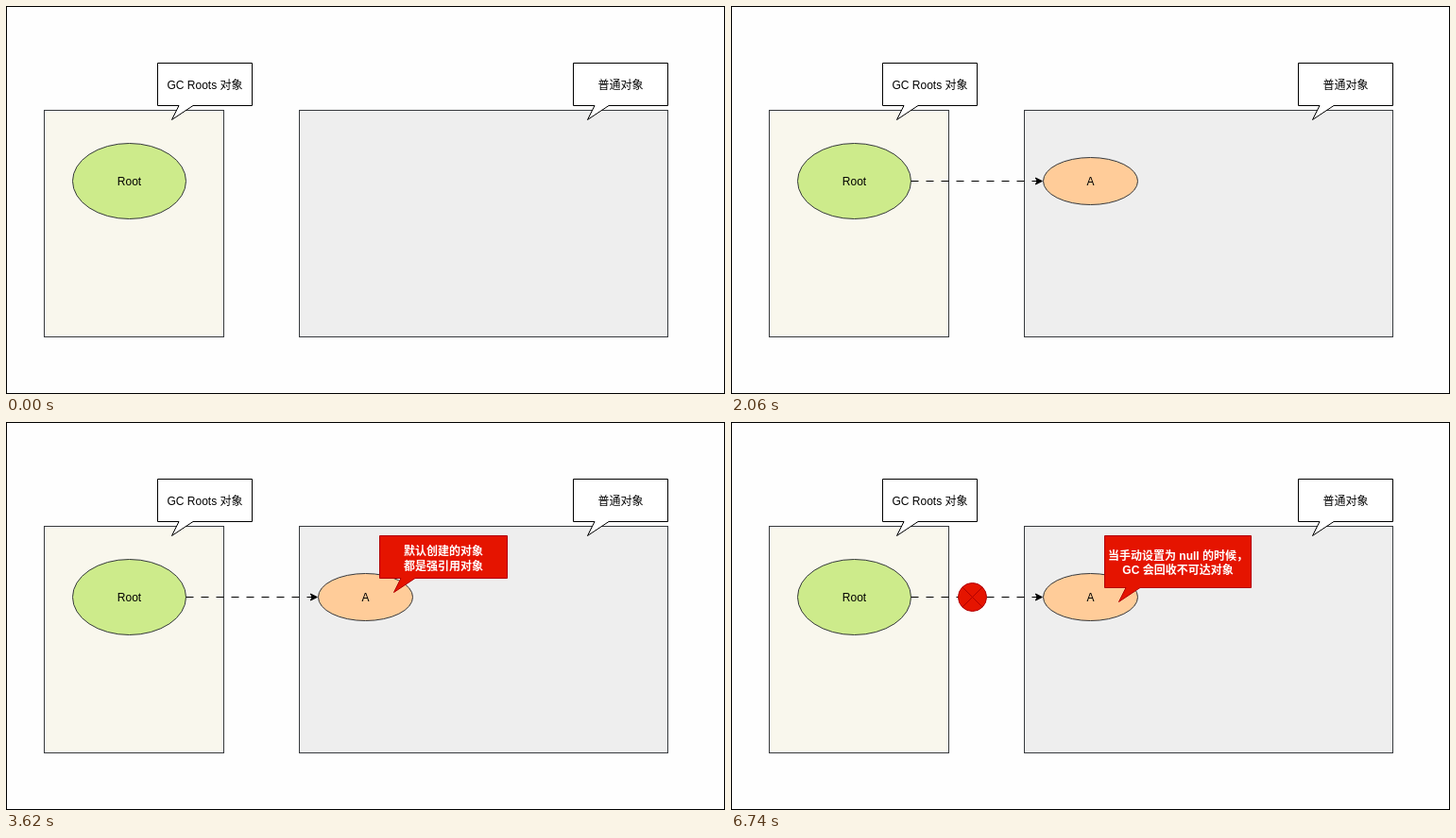
Write an HTML page that moves like this. It is 761 by 411 pixels and loops after 8000 ms.

```html
<!DOCTYPE html>
<html lang="zh-CN">
<head>
<meta charset="utf-8">
<style>
  html, body { margin: 0; width: 100%; height: 100%; overflow: hidden; background: #fefefe; }
  svg { display: block; }
  text {
    font: 12px "Liberation Sans", "Noto Sans CJK SC", "Noto Sans CJK", sans-serif;
    text-anchor: middle;
  }
  .note text { font-weight: bold; fill: #fff; }
</style>
</head>
<body>
<svg id="stage" width="761" height="411" viewBox="0 0 761 411"></svg>
<script>
const LOOP = 8000;
const DARK = "#36393d", RED = "#e51400", DEEP_RED = "#b20000";
const stage = document.getElementById("stage");

function add(parent, tag, attrs, content) {
  const el = document.createElementNS("http://www.w3.org/2000/svg", tag);
  for (const key in attrs) el.setAttribute(key, attrs[key]);
  if (content) el.textContent = content;
  parent.appendChild(el);
  return el;
}

const group = (name = "") => add(stage, "g", { class: name });

function box(x, y, width, height, fill, stroke) {
  add(stage, "rect", { x, y, width, height, fill, stroke });
}

function label(parent, x, y, content) {
  add(parent, "text", { x, y }, content);
}

function oval(parent, cx, cy, rx, ry, fill, name) {
  add(parent, "ellipse", { cx, cy, rx, ry, fill, stroke: DARK });
  label(parent, cx, cy + 4.5, name);
}

// Speech box whose tail hangs 15px below its lower edge.
function callout(parent, x, y, w, h, tail, fill, stroke) {
  const d = `M${x} ${y}h${w}v${h}H${x + tail + 15}L${x + 15} ${y + h + 15}L${x + tail} ${y + h}H${x}Z`;
  add(parent, "path", { d, fill, stroke, "stroke-miterlimit": 10 });
}

function note(w, h, lines) {
  const g = group("note");
  callout(g, 395.5, 120.5, w, h, 22.5, RED, DEEP_RED);
  lines.forEach(([y, content]) => label(g, 395.5 + w / 2, y, content));
  return g;
}

box(0.5, 0.5, 760, 410, "none", "#000");
box(40.5, 110.5, 190, 240, "#f9f7ed", DARK);
box(310.5, 110.5, 390, 240, "#eee", DARK);
callout(stage, 160.5, 60.5, 100, 45, 22.5, "#fff", "#000");
label(stage, 210.5, 88, "GC Roots 对象");
callout(stage, 600.5, 60.5, 100, 45, 22.5, "#fff", "#000");
label(stage, 650.5, 88, "普通对象");
oval(stage, 130.5, 185.5, 60, 40, "#cdeb8b", "Root");

const objectA = group();
oval(objectA, 380.5, 185.5, 50, 25, "#fc9", "A");

const link = group();
add(link, "path", { d: "M190.5 185.5H324.13", stroke: "#000", "stroke-dasharray": "8 8" });
add(link, "path", { d: "M329.38 185.5l-7 3.5 1.75-3.5-1.75-3.5Z", stroke: "#000" });

const strongNote = note(135, 45, [[141, "默认创建的对象"], [156.5, "都是强引用对象"]]);
const memoryNote = note(215, 55, [
  [139, "当程序内存不足的时候，"],
  [153, "JVM 宁可抛出 OutOfMemory 错误，"],
  [168, "也不会回收强引用对象"]
]);
const nullNote = note(155, 55, [[146, "当手动设置为 null 的时候，"], [161, "GC 会回收不可达对象"]]);

const cut = group();
add(cut, "circle", { cx: 255.5, cy: 185.5, r: 15, fill: RED, stroke: DEEP_RED });
add(cut, "path", { d: "M244.9 174.9l21.2 21.2m0-21.2l-21.2 21.2", stroke: DEEP_RED });

// Each part is visible from its start time until its end time.
const timeline = [
  [objectA, 500, LOOP],
  [link, 2060, LOOP],
  [strongNote, 3620, 5180],
  [memoryNote, 5180, 6740],
  [nullNote, 6740, LOOP],
  [cut, 6740, LOOP]
];

function render(time) {
  for (const [part, start, end] of timeline) {
    part.setAttribute("visibility", time >= start && time < end ? "visible" : "hidden");
  }
}

const began = performance.now();
function tick() {
  render((performance.now() - began) % LOOP);
  requestAnimationFrame(tick);
}
tick();
</script>
</body>
</html>
```
